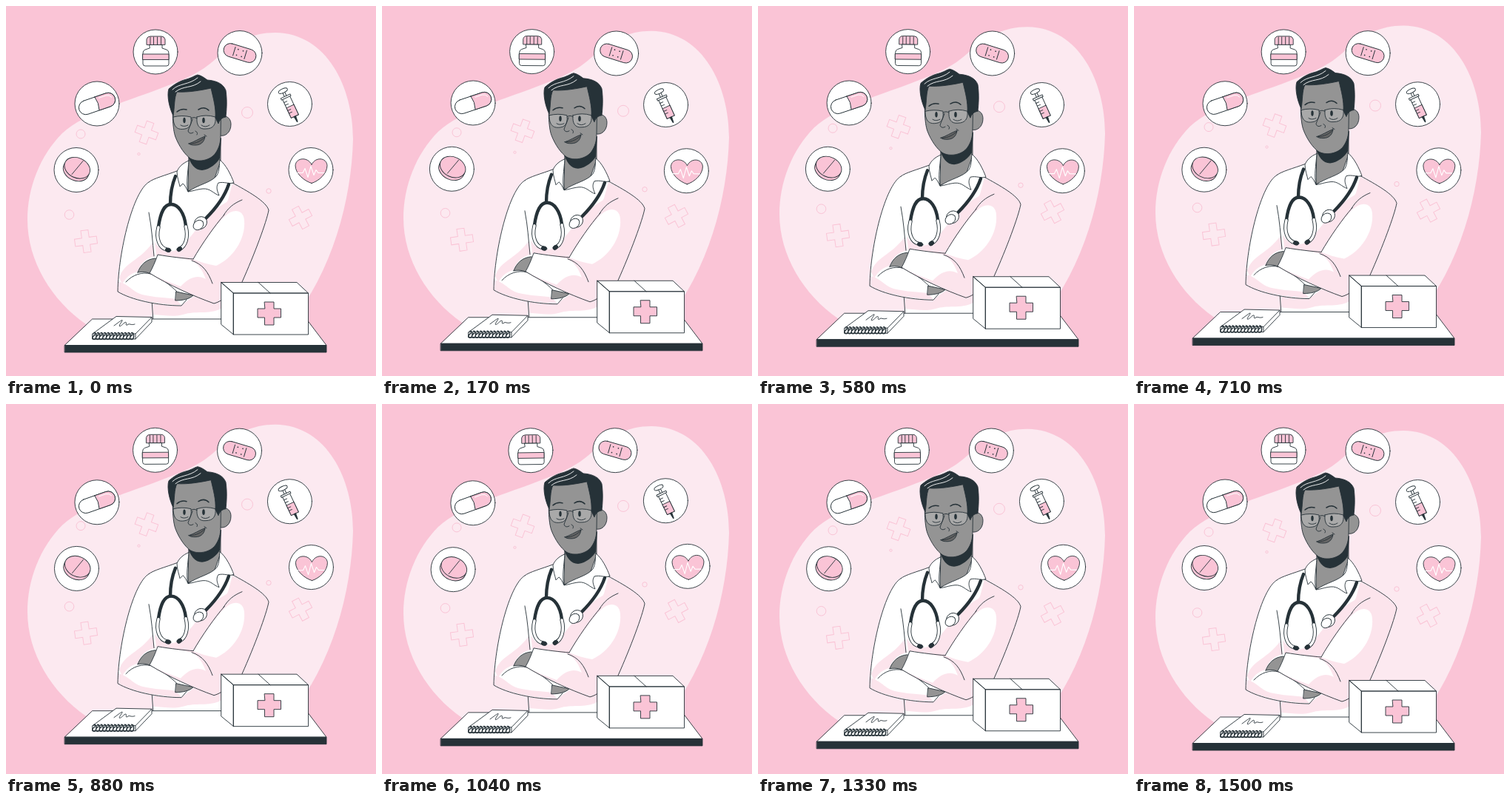
An HTML page for the animation above (1.54 s loop, 500 by 500 pixels).

```html
<!DOCTYPE html>
<html lang="en">
<head>
<meta charset="utf-8">
<title>Doctor</title>
<style>
  html, body { margin: 0; height: 100%; overflow: hidden; background: #fac4d6; }
  svg { display: block; width: 100%; height: 100%; }
  .ink { stroke: #263238; stroke-width: .9; stroke-linecap: round; stroke-linejoin: round; }
  .white { fill: #fff; }
  .pink { fill: #fac4d6; }
  .pale { fill: #fce4ec; }
  .dark { fill: #263238; }
  .skin { fill: #949494; }
  .line { fill: none; }
  .tube { fill: none; stroke: #263238; stroke-width: 4.4; stroke-linecap: round; }
  .decor { fill: none; stroke: #fac4d6; stroke-width: 1; }
</style>
</head>
<body>
<svg viewBox="0 0 500 500">
  <defs>
    <path id="plus" d="M-5 -15H5V-5H15V5H5V15H-5V5H-15V-5H-5Z"/>
    <circle id="badge" r="30" class="ink white"/>
  </defs>

  <g id="scene">
    <path fill="#fce9f0" d="M108 430C62 398 29 345 29 289C29 246 46 202 76 172C108 143 165 129 220 107C238 100 263 91 285 70C307 49 333 36 364 36C434 37 469 110 469 180C467 262 441 360 383 430Z"/>

    <g class="decor">
      <circle cx="101" cy="173" r="6"/>
      <circle cx="326" cy="144" r="7.5"/>
      <circle cx="85.5" cy="282" r="6.3"/>
      <circle cx="355" cy="250" r="3.2"/>
      <circle cx="179.5" cy="200" r="1.6"/>
      <use href="#plus" transform="translate(190 171) rotate(20)"/>
      <use href="#plus" transform="translate(108 318) rotate(-8)"/>
      <use href="#plus" transform="translate(398 286) rotate(-28)"/>
    </g>

    <g id="doctor" class="ink">
      <!-- coat -->
      <path class="white" stroke="none" d="M231 223C215 229 199 233 193 238L193 278L197 397L199 426H296L318 373L355 276C352 268 326 250 306 239L289 208L246 209Z"/>
      <path class="pale" stroke="none" d="M201 318C208 332 224 337 238 325C256 306 272 277 304 262L253 345L203 337Z"/>
      <path class="pale" stroke="none" d="M198 402L236 405L254 392L280 399L292 394V408C278 417 258 412 243 416C228 421 214 418 199 417Z"/>
      <path class="line" d="M231 223C215 229 199 233 193 238M197 397L199 426"/>

      <!-- neck and collar -->
      <path class="skin" d="M247 201L246 250L280 238L290 210V180Z"/>
      <path class="dark" stroke="none" d="M245 200C249 213 255 222 265 222C276 221 285 212 289 206L291 178Z"/>
      <path class="white" d="M247 209C239 212 233 218 231 224C231 231 234 239 235 244L239 240C242 242 244 247 246 251C243 238 246 225 247 209Z"/>
      <path class="white" d="M289 208C297 214 304 228 308 239C301 241 295 237 287 239C283 245 286 251 288 256C281 254 276 246 266 247C257 248 253 250 246 251C260 241 277 239 285 229C289 222 288 214 289 208Z"/>

      <!-- stethoscope -->
      <path class="tube" d="M229 230C224 242 222 255 222 268M301 241C295 259 283 274 270 287"/>
      <path class="tube" d="M206 298C209 278 214 268 223 268C233 268 241 280 243 297"/>
      <path class="line" stroke-width="5.2" d="M206 299C202 315 208 327 217 329M243 298C247 313 242 325 235 328"/>
      <path class="line" style="stroke:#fff;stroke-width:3.4" d="M206 299C202 315 208 327 217 329M243 298C247 313 242 325 235 328"/>
      <ellipse class="dark" cx="219" cy="329.8" rx="3.8" ry="2.7" transform="rotate(12 219 330)"/>
      <ellipse class="dark" cx="234.5" cy="328.8" rx="3.6" ry="2.8" transform="rotate(-35 234 329)"/>
      <ellipse class="white" cx="263" cy="293" rx="9" ry="8" transform="rotate(-40 263 293)"/>
      <ellipse class="white" cx="260" cy="296" rx="7.5" ry="6" transform="rotate(-40 260 296)"/>

      <!-- crossed arms -->
      <path class="white" stroke="none" d="M193 238C172 250 152 330 151 386C169 397 205 405 237 405L244 397L230 386C212 371 190 357 178 359L201 338L193 279Z"/>
      <path class="pale" stroke="none" d="M153 367C160 346 180 345 198 320L201 338C186 342 181 350 178 359C168 361 161 368 157 376Z"/>
      <path class="pale" stroke="none" d="M152 373C164 374 169 385 184 390C200 394 218 394 229 396L237 404C205 404 169 396 151 386Z"/>
      <path class="line" d="M193 238C172 250 152 330 151 386C169 397 205 405 237 405L244 397M193 279C197 300 198 318 200 338"/>
      <path class="line" d="M162 373C171 363 184 359 196 362C210 368 222 377 231 386"/>
      <path class="skin" d="M178 360C182 349 190 342 202 341L207 345L195 362C190 359 184 359 178 360Z"/>
      <path class="skin" d="M230 386L253 391C248 396 239 398 229 398Z"/>
      <path class="pale" stroke="none" d="M306 240C326 250 352 264 355 276C352 292 336 335 319 373C311 388 297 397 281 402C253 392 220 377 194 361C198 354 202 345 205 336C222 339 241 341 253 342C267 321 282 297 300 262Z"/>
      <path class="white" stroke="none" d="M205 336C222 339 241 341 251 344C262 350 266 359 270 369C258 362 246 368 236 379C222 374 207 368 194 361C198 354 202 345 205 336Z"/>
      <path class="white" stroke="none" d="M253 342C267 321 280 298 296 284C306 274 321 274 322 290C324 316 306 341 284 351C272 349 262 346 253 342Z"/>
      <path class="line" d="M253 342C241 341 222 339 205 336C202 345 198 354 194 361C220 377 253 392 281 402C289 400 297 394 303 388"/>
      <path class="line" d="M251 344C266 349 273 359 279 375M253 342C265 321 282 297 295 282M319 262C307 267 300 273 294 283M306 239C326 250 352 264 355 276C352 292 336 335 319 373"/>

      <!-- head -->
      <path class="skin" d="M286 153C295 145 304 150 304 160C304 171 296 177 289 175Z"/>
      <path class="skin" d="M227 112C224 142 225 166 229 177C234 190 242 201 249 206C259 212 276 209 283 199C288 192 290 184 290 176L291 112L268 104Z"/>
      <path class="dark" d="M226 148C221 139 217 121 220 112C227 106 235 101 244 99C251 97 255 94 259 93C264 94 268 97 272 100C286 101 294 106 297 114C299 128 298 141 297 150C290 151 288 156 287 159L283 151C284 138 280 124 277 111C263 114 246 117 231 116C227 124 228 137 226 148Z"/>
      <path class="line" style="stroke:#fff" d="M225 113C234 104 247 107 259 97M229 116C240 107 251 112 263 102"/>
      <g class="line">
        <path stroke-width="1.5" d="M231 143Q237 138 244 140M260 140Q268 135 274 141"/>
        <path fill="#a9a9a9" d="M226 150Q238 147 250 150C251 158 249 165 242 166C232 168 226 164 226 150ZM258 150Q270 146 283 150C284 160 280 166 270 166C261 167 257 161 258 150Z"/>
        <path d="M250 152Q254 149 258 152M283 151L288 153"/>
        <path d="M252 153C250 160 247 165 246 169Q248 174 253 171M256 169Q260 171 258 174"/>
        <path d="M264 161Q269 165 275 161M236 161Q240 164 246 161"/>
      </g>
      <g class="dark" stroke="none">
        <ellipse cx="241" cy="154.5" rx="1.7" ry="3.7"/>
        <ellipse cx="267" cy="154.5" rx="1.8" ry="3.8"/>
      </g>
      <path fill="#656565" d="M247 186C254 184 261 179 269 176C268 184 263 188 256 188C252 188 250 188 247 186Z"/>
      <path class="line" d="M249 186C257 186 264 182 269 177M268 174L271 176"/>
    </g>

    <g id="desk" class="ink">
      <path class="white" d="M117 423H406L433 458.5H79.5Z"/>
      <path class="dark" d="M79.5 458.5H433V468H79.5Z"/>
      <path class="white" d="M117 443L149 419.5L197 420.5V427L175 450H117Z"/>
      <path class="line" d="M117 443H175L197 420.5M175 443V450"/>
      <path class="line" d="M146 432C153 427 160 421 156 427C151 434 153 435 160 428C165 425 160 433 164 431C167 428 168 432 174 430"/>
      <path id="spiral" class="line" stroke-width="1.5"/>

      <path class="white" d="M291 373.5L307.5 388V444L291 430.5ZM291 373.5H393L408.5 388H307.5ZM307.5 388H408.5V444H307.5Z"/>
      <path class="line" d="M341 373.5L357 388"/>
      <path class="pink" d="M349.5 400H362V409H371.5V421H362V431H349.5V421H340V409H349.5Z"/>
    </g>
  </g>

  <g id="icons" class="ink">
    <g transform="translate(95 221.5)">
      <use href="#badge"/>
      <g transform="rotate(25)">
        <path class="pink" d="M-18 -2V1A18 13.5 0 0 0 18 1V-2Z"/>
        <ellipse class="pink" cy="-3" rx="18" ry="13.5"/>
      </g>
      <path class="line" d="M-6 6L9 -12"/>
    </g>

    <g transform="translate(123 132)">
      <use href="#badge"/>
      <g transform="rotate(-19)">
        <rect class="white" x="-25.5" y="-9.5" width="51" height="19" rx="9.5"/>
        <path class="pink" d="M0 -9.5H16A9.5 9.5 0 0 1 16 9.5H0Q3 0 0 -9.5Z"/>
        <path class="line" style="stroke:#fff" d="M5 -6.5H15Q20 -6 21.5 -2"/>
      </g>
    </g>

    <g transform="translate(202 62)">
      <use href="#badge"/>
      <path class="white" d="M-8 -10H9V-5L15 -3Q18 -2 18 2V16Q18 19 15 19H-14Q-17 19 -17 16V2Q-17 -2 -14 -3L-8 -5Z"/>
      <path class="pink" d="M-17 3H18V10.5H-17ZM-12 -10V-17Q-11 -21 -7 -21H8Q12 -21 13 -17V-10Z"/>
      <path class="line" d="M-7 -20V-10M-2.5 -20V-10M2.5 -20V-10M7.5 -20V-10"/>
    </g>

    <g transform="translate(316 63.5)">
      <use href="#badge"/>
      <g transform="rotate(17)">
        <rect class="pink" x="-22.5" y="-9" width="45" height="18" rx="9"/>
        <path class="line" d="M-8 -6V6M8 -6V6"/>
        <path class="line" stroke-width="1.7" d="M-3.5 -4h0M3.5 -4h0M-3.5 4h0M3.5 4h0"/>
      </g>
    </g>

    <g transform="translate(383.5 132.5)">
      <use href="#badge"/>
      <g transform="translate(.5 3) rotate(-25)">
        <path class="white" d="M-1.5 -22H1.5V-14H-1.5Z"/>
        <ellipse class="white" cy="-23" rx="6.5" ry="2.7"/>
        <path class="white" d="M-5.5 -13H5.5V15H-5.5Z"/>
        <path class="pink" d="M-5.5 0H5.5V15H-5.5Z"/>
        <path class="white" d="M-7 -15H7V-12.5H-7Z"/>
        <path class="dark" d="M-1.3 15H1.3L.4 23H-.4Z"/>
        <path class="line" d="M-5.5 -8H-1M-5.5 -4H-1M-5.5 4H-1M-5.5 8H-1"/>
      </g>
    </g>

    <g transform="translate(412 221.5)">
      <use href="#badge"/>
      <path class="pink" d="M1 18C-9 15 -21 5 -21 -6C-20 -17 -4 -18 1 -7C6 -18 21 -17 22 -6C22 5 11 15 1 18Z"/>
      <path class="line" style="stroke:#fff;stroke-width:1.1" d="M-18 4H-11L-8 -2L-4 10L0 -5L4 7L7 0L10 4H18"/>
    </g>
  </g>
</svg>
<script>
  const LOOP = 1540, FPS = 24, STEPS = 36;
  const find = id => document.getElementById(id);
  const scene = find('scene'), icons = find('icons');

  let coils = '';
  for (let x = 119; x < 174; x += 4.6) coils += `M${x} 441.5c4 0 4 9 0 9c-3 0 -3 -4 1 -6`;
  find('spiral').setAttribute('d', coils);

  // Triangle wave: 0 at the ends of a cycle, 1 in the middle.
  const triangle = p => 1 - Math.abs(2 * (p - Math.floor(p)) - 1);

  function draw(now) {
    const step = Math.min(STEPS, Math.floor((now % LOOP + 5) * FPS / 1000));
    const p = step / STEPS;
    const lift = -10 * triangle(p);
    const swing = 2 * triangle(p + .25) - 1;
    scene.setAttribute('transform', `translate(0 ${lift})`);
    icons.setAttribute('transform', `rotate(${swing} 253.5 141.5)`);
    requestAnimationFrame(draw);
  }
  draw(performance.now());
</script>
</body>
</html>
```
